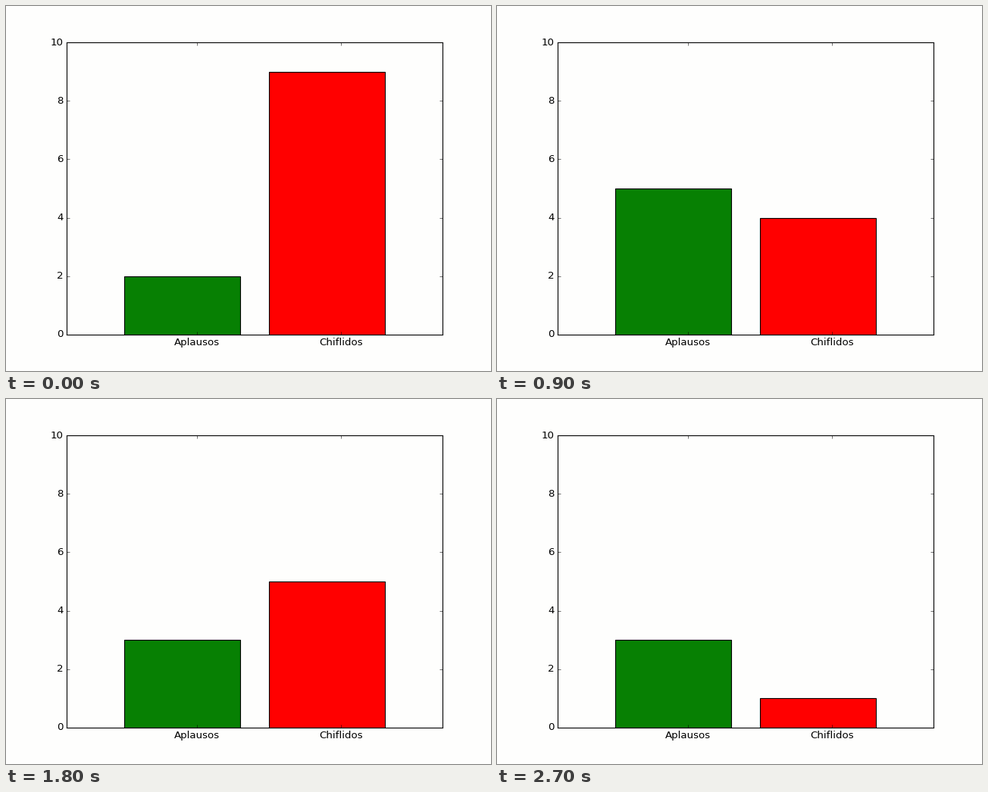
A matplotlib script that plays this animation: 640x482 px, repeating every 3 s.

```python
import matplotlib.pyplot as plt
from matplotlib.animation import FuncAnimation

WIDTH, HEIGHT, DPI = 640, 482, 80
BACKGROUND = "#fefefd"

# (applause, whistles) for each step
VOTES = [(2, 9), (1, 1), (8, 2), (5, 4), (5, 9),
         (10, 1), (3, 5), (7, 1), (4, 8), (3, 1)]

plt.style.use("classic")
plt.rcParams.update({
    "font.family": "DejaVu Sans",
    "font.size": 12,
    "savefig.dpi": "figure",
    "savefig.facecolor": BACKGROUND,
})

fig = plt.figure(figsize=(WIDTH / DPI, HEIGHT / DPI), dpi=DPI,
                 facecolor=BACKGROUND)
ax = fig.add_axes([0.125, 0.1, 0.775, 0.8], facecolor=BACKGROUND)
ax.set_axisbelow(False)

bars = ax.bar([0, 1], VOTES[0], width=0.8, align="edge",
              color=["#078003", "#ff0000"], edgecolor="black", linewidth=1)
ax.set_xlim(-0.4, 2.2)
ax.set_ylim(0, 10)
ax.set_xticks([0.5, 1.5], ["Aplausos", "Chiflidos"])
ax.set_yticks(range(0, 11, 2))


def update(step):
    for bar, votes in zip(bars, VOTES[step]):
        bar.set_height(votes)
    return list(bars)


anim = FuncAnimation(fig, update, frames=len(VOTES), interval=300,
                     repeat=True, repeat_delay=0, blit=False)
plt.show()
```
